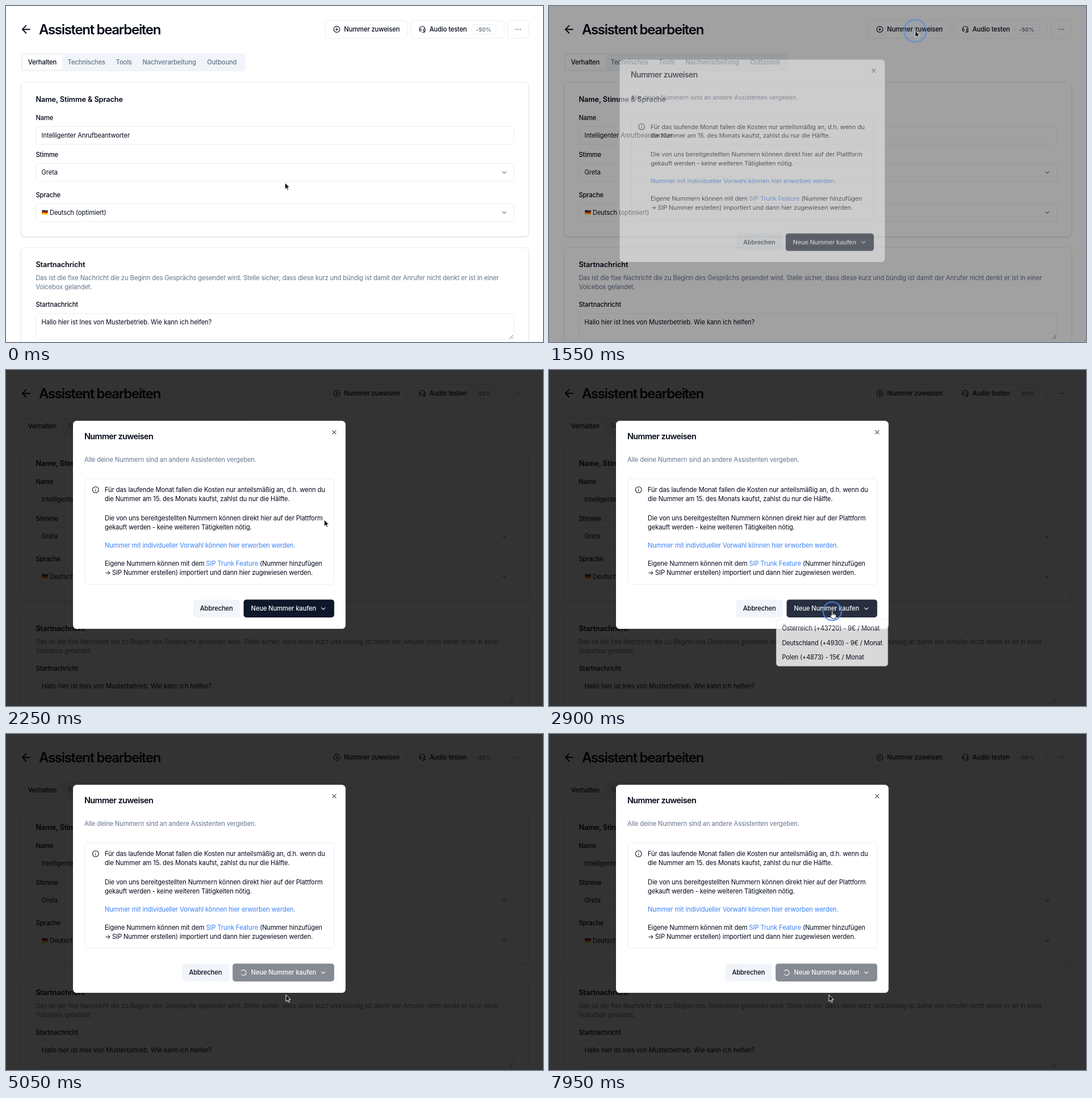
Write an HTML page that moves like this. It is 946 px wide and 592 px high and loops after 8 s.

```html
<!DOCTYPE html>
<html lang="de">
<head>
<meta charset="utf-8">
<title>Assistent bearbeiten</title>
<style>
  html, body { margin: 0; width: 100%; height: 100%; overflow: hidden; background: #fff; }
  svg { display: block; width: 946px; height: 592px; }
  text {
    font: 400 11.2px Inter, sans-serif; font-optical-sizing: none;
    letter-spacing: -.0108em; fill: #020817; white-space: pre;
  }
  .medium { font-weight: 500; }
  .muted { fill: #64748b; }
  .heading { font-size: 12.8px; font-weight: 600; letter-spacing: -.01em; }
  .dialog-title { font-size: 14.4px; font-weight: 600; letter-spacing: -.04em; }
  .page-title { font-size: 24px; font-weight: 600; letter-spacing: -.055em; }
  .badge { font-size: 9.6px; font-weight: 500; letter-spacing: .03em; fill: #475569; }
  .link { fill: #3b82f6; }
  .light { fill: #f8fafc; }
  .box { fill: #fff; stroke: #e2e8f0; stroke-width: .8; }
  .soft { fill: #f1f5f9; }
  .icon { fill: none; stroke: #020817; stroke-width: 2; stroke-linecap: round; stroke-linejoin: round; }
  .shadow { filter: drop-shadow(0 1px 1px #0002); }
</style>
</head>
<body>
<svg id="stage" viewBox="0 0 946 592"></svg>
<script>
const LOOP = 8000, ICON = 12.8 / 24;

const SIZES = { heading: 12.8, 'dialog-title': 14.4, 'page-title': 24, badge: 9.6 };
// y is the middle of the capital letters
const text = (x, y, content, cls = '') =>
  `<text x="${x}" y="${y + .364 * (SIZES[cls] || 11.2)}" class="${cls}">${content}</text>`;
const rect = (left, top, right, bottom, radius, cls, extra = '') =>
  `<rect x="${left}" y="${top}" width="${right - left}" height="${bottom - top}" rx="${radius}" class="${cls}" ${extra}/>`;
// icons are drawn on a 24 unit grid and placed by their centre
const icon = (x, y, path, extra = '', scale = ICON) =>
  `<g transform="translate(${x} ${y}) scale(${scale}) translate(-12 -12)"><path class="icon" d="${path}" ${extra}/></g>`;

const CIRCLE = 'M22 12a10 10 0 1 1-20 0a10 10 0 1 1 20 0';
const CHEVRON = 'M6 9l6 6 6-6';
const HEADPHONES = 'M3 11h3a2 2 0 0 1 2 2v3a2 2 0 0 1-2 2H5a2 2 0 0 1-2-2zM3 11a9 9 0 1 1 18 0M21 11v5a2 2 0 0 1-2 2h-1a2 2 0 0 1-2-2v-3a2 2 0 0 1 2-2zM21 16v2a4 4 0 0 1-4 4h-5';

const stripe = (y, color) =>
  `<path fill="${color}" d="M63.3 ${y}q2.7-1.3 5.3-.4t5.2-.5v2.7q-2.6 1.3-5.2.5t-5.3.4z"/>`;
const flag = stripe(360.3, '#222') + stripe(362.8, '#d20') + stripe(365.3, '#fc0');

const select = (top, x, label) =>
  rect(52.4, top, 894.6, top + 31.6, 4.8, 'box') + text(x, top + 15.9, label) +
  icon(877.7, top + 15.8, CHEVRON, 'opacity=".6"');

const page = [
  icon(35.4, 41.2, 'M12 19l-7-7 7-7M19 12H5', '', 22.4 / 24),
  text(58, 41.7, 'Assistent bearbeiten', 'page-title'),

  rect(562.8, 25.4, 706.8, 57, 4.8, 'box', 'id="assign"'),
  icon(582.7, 41.2, CIRCLE + 'M8 12h8M12 8v8'),
  text(595.6, 41.2, 'Nummer zuweisen', 'medium'),
  rect(713.4, 25.4, 877.4, 57, 4.8, 'box'),
  icon(733.3, 41, HEADPHONES),
  text(746, 41.2, 'Audio testen', 'medium'),
  rect(819.6, 32.6, 863.6, 49.6, 8.5, 'box'),
  text(828, 41.3, '-50%', 'badge'),
  rect(884, 25.4, 920.8, 57, 4.8, 'box'),
  icon(902.4, 41.2, 'M5 12h.01M12 12h.01M19 12h.01', 'style="stroke-width:3"'),

  rect(26.4, 83, 421.6, 115, 4.8, 'soft'),
  rect(29.4, 86, 99.4, 112, 3.2, '', 'fill="#fff"'),
  text(38.8, 99.2, 'Verhalten', 'medium'),
  text(108.6, 99.2, 'Technisches', 'medium muted'),
  text(193.6, 99.2, 'Tools', 'medium muted'),
  text(240.4, 99.2, 'Nachverarbeitung', 'medium muted'),
  text(354.2, 99.2, 'Outbound', 'medium muted'),

  rect(26.4, 134.4, 920.6, 406, 6.4, 'box shadow'),
  text(52.4, 164, 'Name, Stimme &amp; Sprache', 'heading'),
  text(52.4, 196.8, 'Name', 'medium'),
  rect(52.4, 212, 894.6, 243.6, 4.8, 'box'),
  text(62.6, 228.2, 'Intelligenter Anrufbeantworter'),
  text(52.4, 262.4, 'Stimme', 'medium'),
  select(277.4, 62.6, 'Greta'),
  text(52.4, 332.6, 'Sprache', 'medium'),
  select(348, 77, 'Deutsch (optimiert)'), flag,

  rect(26.4, 425.8, 920.6, 640, 6.4, 'box shadow'),
  text(52.4, 455.4, 'Startnachricht', 'heading'),
  text(52.4, 479.4, 'Das ist die fixe Nachricht die zu Beginn des Gesprächs gesendet wird. Stelle sicher, dass diese kurz und bündig ist damit der Anrufer nicht denkt er ist in einer', 'muted'),
  text(52.4, 495.4, 'Voicebox gelandet.', 'muted'),
  text(52.4, 526.4, 'Startnachricht', 'medium'),
  rect(52.4, 542, 894.6, 587.4, 4.8, 'box'),
  text(62.6, 557, 'Hallo hier ist Ines von Musterbetrieb. Wie kann ich helfen?'),
  '<path d="M887 586l6-6M890.5 586l2.5-2.5" stroke="#555" stroke-width=".8"/>'
].join('');

const dialog = [
  rect(118, 89.6, 598.2, 456, 6.4, '', 'fill="#fff"'),
  text(138, 117, 'Nummer zuweisen', 'dialog-title'),
  icon(578.2, 109.6, 'M18 6L6 18M6 6l12 12', 'opacity=".75"'),
  text(138, 157.8, 'Alle deine Nummern sind an andere Assistenten vergeben.', 'muted'),
  rect(138.4, 191.6, 578.2, 377.8, 6.4, 'box'),
  icon(157.8, 211, CIRCLE + 'M12 16v-4M12 8h.01'),
  text(174, 211, 'Für das laufende Monat fallen die Kosten nur anteilsmäßig an, d.h. wenn du'),
  text(174, 227, 'die Nummer am 15. des Monats kaufst, zahlst du nur die Hälfte.'),
  text(174, 261.2, 'Die von uns bereitgestellten Nummern können direkt hier auf der Plattform'),
  text(174, 277.2, 'gekauft werden - keine weiteren Tätigkeiten nötig.'),
  text(174, 309.2, 'Nummer mit individueller Vorwahl können hier erworben werden.', 'link'),
  text(174, 341.2, 'Eigene Nummern können mit dem <tspan class="link">SIP Trunk Feature</tspan> (Nummer hinzufügen'),
  text(174, 357.2, '→'), text(187, 357.2, 'SIP Nummer erstellen) importiert und dann hier zugewiesen werden.'),
  '<g id="cancel">', rect(329.8, 404.4, 412.4, 436, 4.8, 'soft'),
  text(341.8, 420.4, 'Abbrechen', 'medium'), '</g>',
  '<g id="buy">', rect(418.6, 404.4, 578.2, 436, 4.8, '', 'id="buyBox"'),
  text(431.6, 420.4, 'Neue Nummer kaufen', 'medium light'),
  icon(559, 420.4, CHEVRON, 'style="stroke:#f8fafc"'),
  '<g id="spinner">', icon(0, 0, 'M21 12a9 9 0 1 1-6.219-8.56', 'style="stroke:#f8fafc"'), '</g></g>'
].join('');

const menu = [
  rect(399.6, 440, 597.8, 523.6, 4.8, 'box shadow'),
  rect(403.2, 443.6, 594.2, 469.2, 3.2, 'soft', 'id="highlight"'),
  text(409.6, 456.4, 'Österreich (+43720) - 9€ / Monat'),
  text(409.6, 482, 'Deutschland (+4930) - 9€ / Monat'),
  text(409.6, 507.6, 'Polen (+4873) - 15€ / Monat')
].join('');

const stage = document.getElementById('stage');
stage.innerHTML = `${page}
  <rect id="dim" width="946" height="592"/>
  <g id="dialog">${dialog}</g>
  <g id="menu">${menu}</g>
  <circle id="ring" fill="#4a86e8" fill-opacity=".06" stroke="#4a86e8" stroke-width="2.2"/>
  <g id="cursor" stroke-linejoin="round">
    <path id="arrow" d="M0 0V11.6L2.7 9.1 4.4 13 6.3 12.2 4.6 8.4H8.2Z" stroke="#fff"/>
    <path id="hand" d="M-1.3 .6C-1.3-.9 1.1-.9 1.1 .6V4.3C1.3 3.4 3.2 3.5 3.2 4.6C3.6 3.9 5.1 4.1 5.2 5.2C5.7 4.6 6.9 5 6.9 6.2V8.6C6.9 10 5.8 11 5.8 13H-.6C-.8 11.2-3.6 9-4 7.6C-4.2 6.5-2.7 6.2-1.3 7.6ZM1.1 4V7M3.2 4.6V7M5.2 5.2V7.2" fill="#fff" stroke="#000" stroke-width=".9"/>
  </g>`;
const el = Object.fromEntries([...stage.querySelectorAll('[id]')].map(node => [node.id, node]));

const progress = (time, start, duration) => Math.min(1, Math.max(0, (time - start) / duration));
const easeOut = p => 1 - (1 - p) ** 2.4;
const easeInOut = p => p < .5 ? 4 * p ** 3 : 1 - 4 * (1 - p) ** 3;
const show = (node, visible) => node.setAttribute('visibility', visible ? 'visible' : 'hidden');
const set = (node, attributes) => {
  for (const name in attributes) node.setAttribute(name, attributes[name]);
};
const zoom = (x, y, scale, shift = 0) =>
  `translate(${x} ${y + shift}) scale(${scale}) translate(${-x} ${-y})`;

const START = [491.6, 311.4];
const MOVES = [
  { start: 350, duration: 950, to: [645, 43.6] },
  { start: 1750, duration: 950, to: [499, 425] },
  { start: 3600, duration: 450, to: [493.2, 459.6] }
];
const CLICKS = [1420, 2840, 4430];
const DIALOG_OPEN = 1525, MENU_OPEN = 2825, MENU_CLOSE = 4550, LOADING = 4620;

function cursorAt(time) {
  let position = START;
  for (const { start, duration, to } of MOVES) {
    const p = easeInOut(progress(time, start, duration));
    position = position.map((value, i) => value + (to[i] - value) * p);
  }
  return position;
}

function draw(time) {
  const [x, y] = cursorAt(time);
  const within = (left, top, right, bottom) => x > left && x < right && y > top && y < bottom;

  const opened = easeOut(progress(time, DIALOG_OPEN, 115));
  set(el.dim, { opacity: .8 * opened });
  set(el.dialog, { opacity: opened, transform: zoom(358, 273, .95 + .05 * opened) });

  const menuIn = easeOut(progress(time, MENU_OPEN, 150));
  const menuOut = easeOut(progress(time, MENU_CLOSE, 150));
  const menuShown = menuIn * (1 - menuOut);
  set(el.menu, {
    opacity: menuShown,
    transform: zoom(498.7, 481.8, .95 + .05 * menuShown, -8 * (1 - menuIn))
  });

  const overAssign = time < 1550 && within(562, 25, 707, 57);
  const overBuy = time > 1700 && time < 2950 && within(418, 404, 578, 436);
  const overItem = time > 3600 && time < MENU_CLOSE && within(403, 443, 594, 469);
  el.assign.style.fill = overAssign ? '#f1f5f9' : '#fff';
  show(el.highlight, overItem);

  const loading = time >= LOADING;
  const widen = loading ? 19.4 : 0;
  set(el.cancel, { transform: `translate(${-widen} 0)` });
  set(el.buy, { opacity: loading ? .5 : 1 });
  set(el.buyBox, { x: 418.6 - widen, width: 159.6 + widen, fill: overBuy ? '#272e3f' : '#0f172a' });
  set(el.spinner, { transform: `translate(418.4 420.4) rotate(${216 + (time - 5050) * 1080 / 2900})` });
  show(el.spinner, loading);

  const age = time - Math.max(...CLICKS.filter(click => click <= time));
  const ringOpacity = Math.min(1, age / 50) * Math.max(0, 1 - age / 400);
  set(el.ring, { cx: x, cy: y, r: 13.2 + Math.min(age, 400) * .05, opacity: ringOpacity || 0 });

  const pointing = overAssign || overBuy || overItem;
  set(el.cursor, { transform: `translate(${x} ${y})` });
  show(el.arrow, !pointing);
  show(el.hand, pointing);
}

const began = performance.now();
function tick() {
  draw((performance.now() - began) % LOOP);
  requestAnimationFrame(tick);
}
tick();
</script>
</body>
</html>
```
